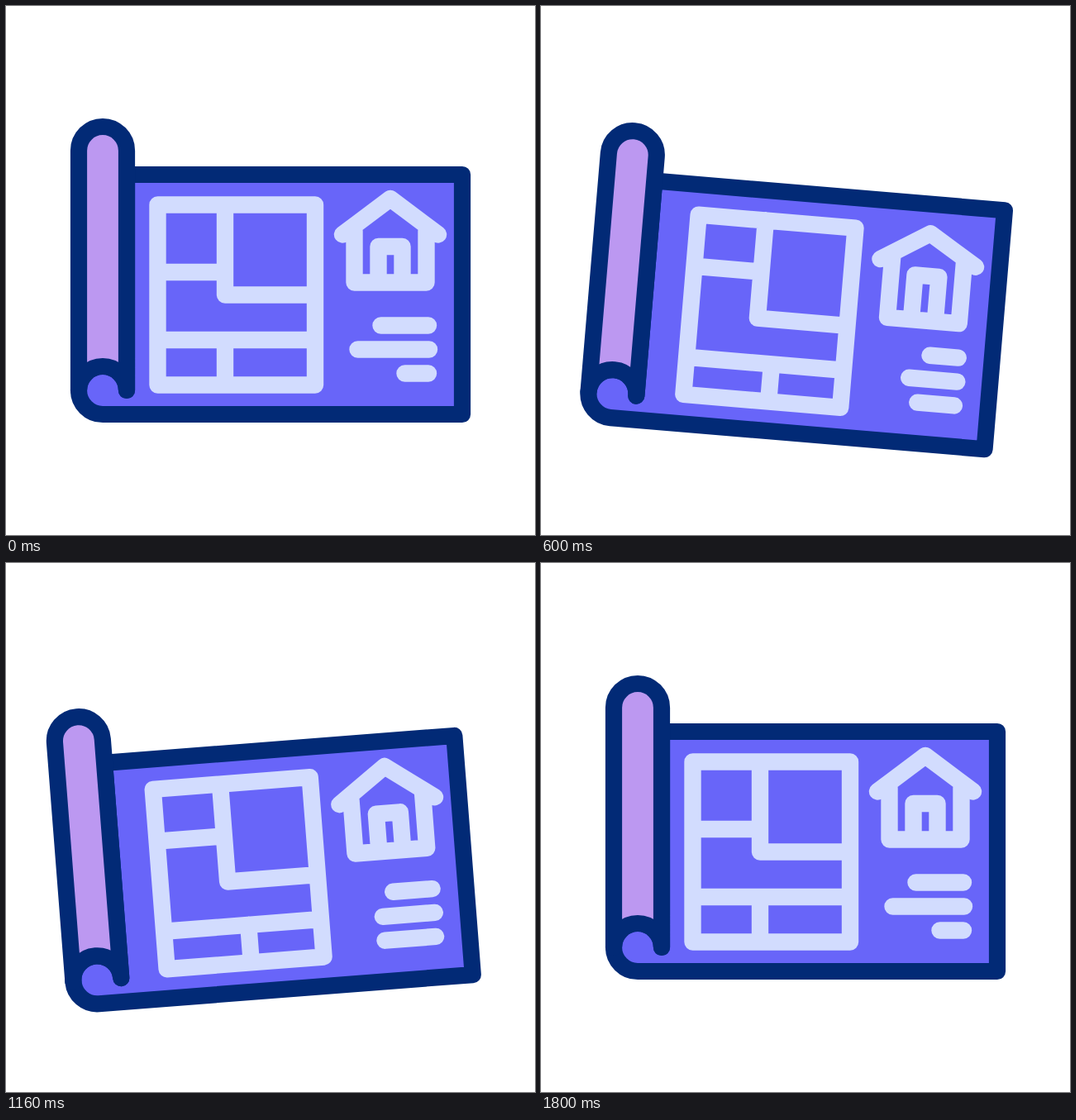
An HTML page that plays this animation: 640 by 640 pixels, repeating every 1.88 s.

```html
<!DOCTYPE html>
<html lang="en">
<head>
<meta charset="utf-8">
<title>Blueprint</title>
<style>
  html, body { margin: 0; height: 100%; overflow: hidden; background: #fff; }
  svg { display: block; width: 100vw; height: 100vh; }
  path { stroke-linecap: round; stroke-linejoin: round; stroke-width: 20.4; }
  .ink { stroke: #022a76; stroke-width: 20.2; }
  .chalk { fill: none; stroke: #d2dcfe; }
</style>
</head>
<body>
<svg viewBox="0 0 640 640">
  <g id="scroll">
    <path id="sheet" class="ink" fill="#6865f9"/>
    <path id="roll" class="ink" fill="#bc98f1"/>
    <path id="plan" class="chalk"/>
    <path id="house" class="chalk"/>
    <path id="notes" class="chalk"/>
  </g>
</svg>
<script>
const LOOP = 1880;
const $ = id => document.getElementById(id);
const draw = (id, d) => $(id).setAttribute('d', d);

// Eased 0..1 between times a and b
const ease = (t, a, b) => {
  const s = Math.min(1, Math.max(0, (t - a) / (b - a)));
  return s * s * (3 - 2 * s);
};
// Rise to 1 during a..b, fall back to 0 during c..d
const swell = (t, a, b, c, d) => ease(t, a, b) - ease(t, c, d);

// Note lines: right end, y, length, change in length, swell times
const notes = [
  [511, 386.5, 57.5, -30, [235, 765, 765, 1410]],
  [512, 415.5, 86.5, -46, [300, 823, 864, 1464]],
  [511, 444.5, 28.5, 44, [350, 960, 970, 1563]]
];

function render(t) {
  const tilt = 5 * ease(t, 40, 550) - 9.45 * ease(t, 550, 1170) + 4.45 * ease(t, 1170, 1757);
  const p = swell(t, 168, 752, 973, 1640);
  const h = swell(t, 220, 720, 700, 1340);

  $('scroll').setAttribute('transform', `translate(0 ${28 * p}) rotate(${tilt} 320 320)`);

  // Paper and its rolled edge
  const l = 88 - 23 * p, r = l + 58, m = l + 29;
  draw('sheet', `M${r} 465A29 29 0 0 0 ${l} 465A29 29 0 0 0 ${m} 494H552V204H${r}Z`);
  draw('roll', `M${r} 465V175A29 29 0 0 0 ${l} 175V465A29 29 0 0 1 ${r} 465`);

  // Floor plan with sliding walls
  const low = 404 + 11 * p;
  draw('plan', `M183.5 240.5H374V458.5H183.5Z
    M183.5 ${322 - 23 * p}H265
    M265 240.5V${349.5 + 11.5 * p}H374
    M183.5 ${low}H374
    M${265 + 26 * p} ${low}V458.5`);

  // House: apex and floor sink, door top stays
  const eave = 276.5 - 1.5 * h, floor = 334.5 + 12.3 * h;
  draw('house', `M407 ${eave}L465 ${233 + 7.5 * h}L523 ${eave}
    M421.5 272V${floor}H508.5V272
    M450.5 ${floor}V291H479.5V${floor}`);

  draw('notes', notes.map(([x, y, len, grow, times]) =>
    `M${x} ${y}h${-len - grow * swell(t, ...times)}`).join(''));
}

const start = performance.now();
function tick() {
  render((performance.now() - start) % LOOP);
  requestAnimationFrame(tick);
}
tick();
</script>
</body>
</html>
```
